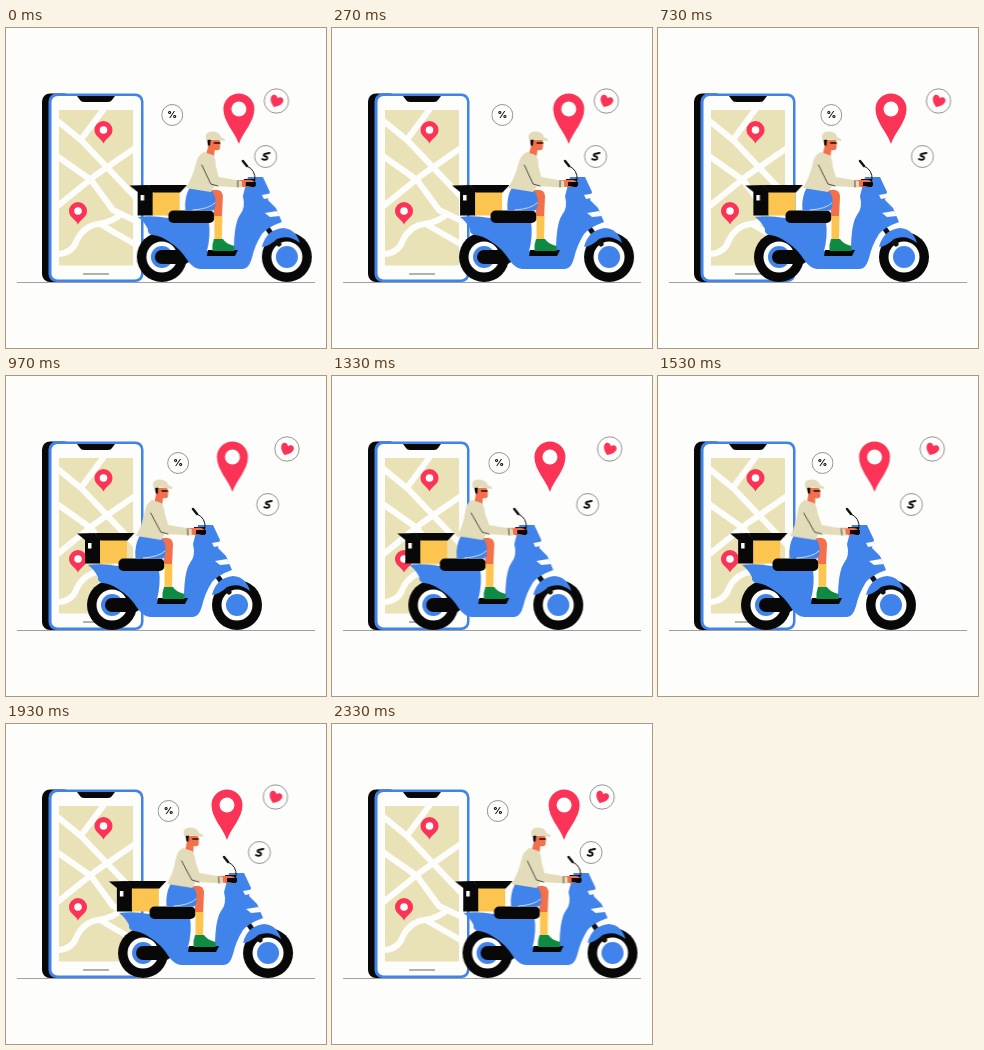
Recreate the animation shown at these times as an HTML page. Size 320 by 320 pixels, loop 2360 ms.

```html
<!DOCTYPE html>
<html lang="en">
<head>
<meta charset="utf-8">
<title>Scooter delivery</title>
<style>
  html, body { margin: 0; width: 100%; height: 100%; overflow: hidden; background: #fdfdfb; }
  svg { display: block; width: 100vw; height: 100vh; }
  .blue { fill: #4083eb; }
  .ink { fill: #080808; }
  .red { fill: #fb3457; }
  .paper { fill: #fdfdfb; }
  .sand { fill: #eae2b7; }
  .coat { fill: #e3dcba; }
  .skin { fill: #f2704a; }
  .gold { fill: #fcc54f; }
  .green { fill: #0f8a43; }
  .line { fill: none; stroke: #111; stroke-linecap: round; stroke-linejoin: round; }
  .road { fill: none; stroke: #fdfdfb; stroke-width: 6; }
  .ring { fill: #fdfdfb; stroke: #666; stroke-width: .7; }
  text { font: 800 9.5px Inter, Arial, sans-serif; text-anchor: middle; }
</style>
</head>
<body>
<svg viewBox="0 0 320 320">
  <defs>
    <clipPath id="map"><path d="M53 82H127V237.500H53Z"/></clipPath>
    <g id="smallPin">
      <path class="red" d="M0 0C-2-5-9-7-9-13.500A9 9 0 0 1 9-13.500C9-7 2-5 0 0Z"/>
      <circle class="paper" cy="-13.500" r="3.800"/>
    </g>
    <g id="wheel">
      <circle class="ink" r="25"/>
      <circle class="paper" r="15.500"/>
      <circle class="blue" r="11"/>
    </g>
  </defs>

  <path d="M11 254.500H309" stroke="#888" stroke-width=".8"/>

  <g id="phone">
    <rect class="ink" x="36" y="65.500" width="30" height="188.500" rx="8"/>
    <rect class="blue" x="42.500" y="65.500" width="95" height="188.500" rx="8"/>
    <rect class="paper" x="45.500" y="68" width="89.500" height="183.500" rx="6"/>
    <path class="ink" d="M71 68H109L106 72Q105 74 102 74H78Q75 74 74 72Z"/>
    <path class="sand" d="M53 82H127V237.500H53Z"/>
    <g clip-path="url(#map)" class="road">
      <path d="M48 90L76 113L132 172"/>
      <path d="M100 78L74 113"/>
      <path d="M132 118L90 147L48 181"/>
      <path d="M48 126L85 152L107 182L132 194"/>
      <path d="M48 226Q66 227 71 212Q78 198 92 196Q108 194 117 184"/>
      <path d="M92 195L132 218"/>
    </g>
    <path d="M77 246H103" stroke="#666" stroke-width="1"/>
    <use href="#smallPin" x="97.500" y="115.500"/>
    <use href="#smallPin" x="72" y="196.500"/>
  </g>

  <g id="pin">
    <path class="red" d="M0 116C-4 104-15.500 94-15.500 81A15.500 15.500 0 0 1 15.500 81C15.500 94 4 104 0 116Z"/>
    <circle class="paper" cy="81" r="7.500"/>
  </g>

  <g id="percent">
    <circle class="ring" cy="87" r="10.500"/>
    <text y="90.300">%</text>
  </g>

  <g id="heart">
    <circle class="ring" cy="73" r="12.200"/>
    <path class="red" transform="rotate(22 0 73)" d="M0 79.500C-3 77.500-6.500 75-6.500 71C-6 67-1.500 67 0 70C1.500 67 6 67 6.500 71C6.500 75 3 77.500 0 79.500Z"/>
  </g>

  <g id="dollar">
    <circle class="ring" cy="128.500" r="11"/>
    <path class="line" stroke-width="1.800" transform="translate(0 128.500)" d="M4-3.500L1-3Q-3-2.500-1.500-.5Q2.500 0 1.500 2.500Q-1 4-3.500 2.500"/>
  </g>

  <g id="scooter">
    <use href="#wheel" x="156" y="229"/>
    <use href="#wheel" x="281" y="229"/>
    <rect class="ink" x="149" y="222" width="36" height="14" rx="7"/>
    <path class="line" stroke-width="5" d="M262 201L273 216"/>

    <g id="box">
      <path class="ink" d="M124 157.500L142 157L148 164H132Z"/>
      <path class="ink" d="M132 163H147.500V187.500H132Z"/>
      <path class="gold" d="M147 164H174V187.500H147Z"/>
      <path class="ink" d="M142 157H181.500L174.500 164.500H147.500Z"/>
      <path class="paper" d="M135 167H138.500V172.500H135Z"/>
    </g>

    <path class="blue" d="M132 189Q146 187 162 190L203 194Q205 208 201 223H228Q228 196 234 187Q240 180 237 168L242 149H257L264 164L262 172L270 180L276 194Q262 199 256 206Q249 217 246 230Q243 241 237 241H194Q187 240 182 233Q174 220 162 213Q155 208 147 207Q141 206 142 201Q138 193 132 189Z"/>
    <path class="blue" d="M256 219Q260 202 277 200Q290 201 294 215Q283 206 271 211Q264 218 256 219Z"/>
    <path class="paper" d="M256 167L267 165L269 169L258 171ZM259 185L271 183L274 188L264 189Z"/>
    <rect class="ink" x="162.500" y="182.500" width="46" height="12.500" rx="5"/>
    <path class="ink" d="M202 222H232L229 228H201Z"/>
    <path class="line" stroke-width="1" d="M249 152Q250 142 241 138"/>
    <path class="line" stroke-width="2.500" d="M237 133L241 138"/>

    <path class="skin" d="M200 164Q216 158 217 168L216 190H208.500L207 176Z"/>
    <path class="gold" d="M208.500 188H216.500L216 212H208.500Z"/>
    <path class="green" d="M208 211H217Q220 216 228.500 218V223H206.500Q206 216 208 211Z"/>
    <path class="blue" d="M184 159L206 163Q211 168 209 180L207 182.500H179.500Q178 170 184 159Z"/>
    <path class="line" style="stroke:#fdfdfb" stroke-width=".7" d="M187 182Q203 181 209 175"/>

    <path class="ink" d="M238 151H249V159H238Z"/>
    <g id="rider">
      <path class="skin" d="M203 112H214L214.500 117L214 121Q212 123 209 122L208 129L200 127L202 120Z"/>
      <path class="ink" d="M201.500 111H205L204 118L202 117Z"/>
      <path class="coat" d="M200 112Q198 104 206 103.500Q214 103.500 215 109L219 111V113L208 111.500Z"/>
      <path class="line" stroke-width="1.500" d="M208.500 115H214"/>
      <path class="skin" d="M229 152L240 152Q248 151 249 155Q248 159 239 159L229 158Z"/>
      <path class="coat" d="M198 124L207 127Q210 130 210 138L213 149L236 153V159.500L209 158L205 164L180 160Q187 149 190 136Q192 127 198 124Z"/>
      <path class="line" stroke-width=".7" d="M196 137L205 156L212 158M232 153V159"/>
    </g>
    <path class="ink" d="M240 154H250V158H240Z"/>
  </g>
</svg>
<script>
  const LOOP = 2360;
  const $ = id => document.getElementById(id);

  // Swings between two transforms, reaching the first one at time `peak`.
  function swing(id, peak, from, to) {
    $(id).animate([{ transform: from }, { transform: to }], {
      duration: LOOP / 2, delay: peak - LOOP, direction: "alternate",
      easing: "ease-in-out", iterations: Infinity
    });
  }

  const slide = x => `translateX(${x}px)`;
  const lean = a => `skewX(${a}deg)`;

  const slides = [
    ["scooter", 50, 0, -55.5],
    ["box", 200, 0, -4],
    ["pin", 370, 237, 216.5],
    ["percent", 700, 173.3, 162.5],
    ["heart", 900, 281, 269],
    ["dollar", 550, 265, 252.7]
  ];
  for (const [id, peak, right, left] of slides) swing(id, peak, slide(right), slide(left));

  $("rider").style.transformOrigin = "182px 160px";
  swing("rider", 300, lean(-.8), lean(5.5));
</script>
</body>
</html>
```
